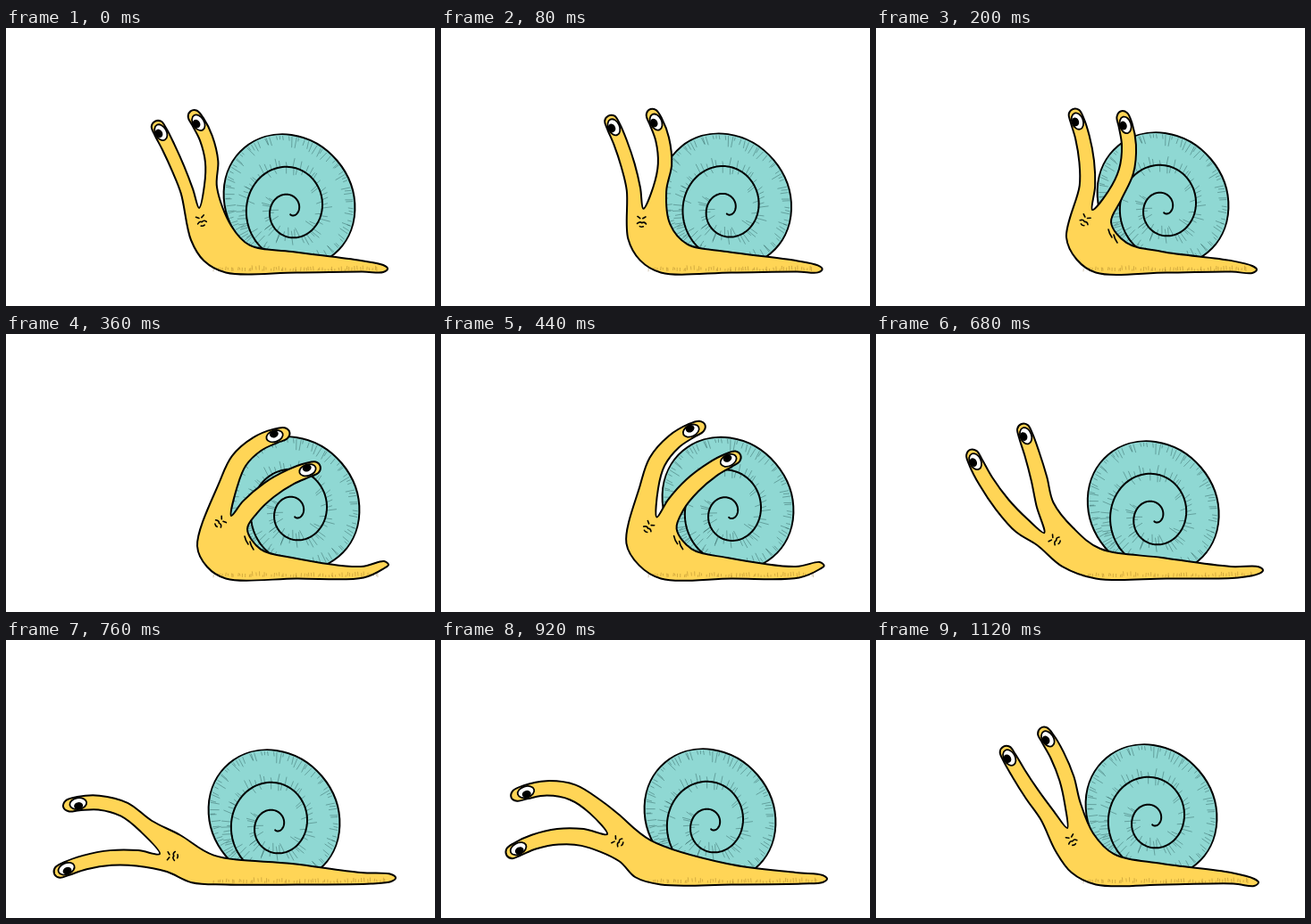
An HTML page with a canvas that plays this animation: 480 by 312 pixels, repeating every 1200 ms.

```html
<!DOCTYPE html>
<html lang="en">
<head>
<meta charset="utf-8">
<title>Snail</title>
<style>
  html, body { margin: 0; width: 100%; height: 100%; overflow: hidden; background: #fff; }
  canvas { display: block; width: 480px; height: 312px; }
</style>
</head>
<body>
<canvas id="stage" width="480" height="312"></canvas>
<script>
const ctx = document.getElementById('stage').getContext('2d');
const LOOP = 1200;
const STEPS = [0, 80, 160, 200, 280, 320, 360, 400, 480, 560, 640, 720, 760, 840, 920, 1040, 1120];
const YELLOW = '#ffd556', TEAL = '#8fd8d3', INK = '#000';
const RAD = Math.PI / 180, GROUND = 274.5;

// lean turns the head; stalks are two angles from upright, reach their length,
// bend how far they bow, girth half their width at the root.
const poses = [
  { time: 0, lean: -15, stalks: [-27, -5], reach: 109, bend: 3, girth: 7,
    fork: [216, 202], chest: [207, 238], nape: [252, 222], tail: [427, 270], shell: [317, 194] },
  { time: 200, lean: 30, stalks: [-11, 16], reach: 115, bend: 8, girth: 9,
    fork: [242, 204], chest: [213, 235], nape: [263, 218], tail: [426, 271], shell: [321, 192] },
  { time: 360, lean: 55, stalks: [35, 61], reach: 114, bend: -23, girth: 11,
    fork: [252, 204], chest: [214, 238], nape: [270, 219], tail: [428, 259], shell: [322, 190] },
  { time: 560, lean: -45, stalks: [-2, 23], reach: 128, bend: -22, girth: 11,
    fork: [199, 212], chest: [181, 222], nape: [238, 217], tail: [431, 264], shell: [317, 193] },
  { time: 760, lean: -85, stalks: [-101, -64], reach: 120, bend: 11, girth: 9,
    fork: [172, 240], chest: [180, 260], nape: [195, 219], tail: [436, 267], shell: [300, 198] },
  { time: 920, lean: -60, stalks: [-102, -69], reach: 115, bend: 13, girth: 10,
    fork: [186, 218], chest: [199, 248], nape: [198, 195], tail: [432, 268], shell: [301, 197] },
  { time: 1120, lean: -25, stalks: [-38, -15], reach: 116, bend: -3, girth: 9,
    fork: [214, 211], chest: [201, 237], nape: [243, 217], tail: [428, 272], shell: [308, 192] }
];

const mix = (a, b, u) => Array.isArray(a) ? a.map((v, i) => mix(v, b[i], u)) : a + (b - a) * u;
const add = (p, q) => [p[0] + q[0], p[1] + q[1]];

function turn([x, y], deg) {
  const c = Math.cos(deg * RAD), s = Math.sin(deg * RAD);
  return [x * c - y * s, x * s + y * c];
}

function random(seed) {
  return () => (seed = (seed * 16807) % 2147483647) / 2147483647;
}

function poseAt(t) {
  const i = poses.findLastIndex(p => p.time <= t);
  const a = poses[i], b = poses[(i + 1) % poses.length];
  const u = (t - a.time) / ((b.time || LOOP) - a.time);
  return Object.fromEntries(Object.keys(a).map(key => [key, mix(a[key], b[key], u)]));
}

// Centripetal closed spline through the points.
function spline(pts) {
  const path = new Path2D(), n = pts.length;
  const gap = (p, q) => Math.sqrt(Math.hypot(p[0] - q[0], p[1] - q[1])) || 0.001;
  const handle = (prev, p, next) => {
    const d = gap(prev, p), e = gap(p, next);
    return p.map((v, k) =>
      (d * d * next[k] - e * e * prev[k] + (2 * d * d + 3 * d * e + e * e) * v) / (3 * d * (d + e)));
  };
  path.moveTo(...pts[0]);
  for (let i = 0; i < n; i++) {
    const [p0, p1, p2, p3] = [n - 1, 0, 1, 2].map(k => pts[(i + k) % n]);
    path.bezierCurveTo(...handle(p0, p1, p2), ...handle(p3, p2, p1), ...p2);
  }
  path.closePath();
  return path;
}

function ellipse(x, y, rx, ry, deg = 0) {
  const path = new Path2D();
  path.ellipse(x, y, rx, ry, deg * RAD, 0, 2 * Math.PI);
  return path;
}

function stroke(path, width, color = INK) {
  ctx.lineWidth = width;
  ctx.strokeStyle = color;
  ctx.stroke(path);
}

function fill(path, color) {
  ctx.fillStyle = color;
  ctx.fill(path);
}

// Shell, drawn around its own centre.
const RIM = { long: 78, short: 70, deg: 50 };
const rimPoint = a => turn([RIM.long * Math.cos(a), RIM.short * Math.sin(a)], RIM.deg);
const rim = ellipse(0, 0, RIM.long, RIM.short, RIM.deg);

function coilPoint(s) {
  const a = (120 + 690 * s) * RAD, r = 3 + 55 * (1 - s);
  return [1 + 0.92 * r * Math.cos(a), 12 - 5 * (1 - s) + r * Math.sin(a)];
}

function makeCoil() {
  const path = new Path2D();
  for (let s = 0; s <= 1; s += 0.005) path.lineTo(...coilPoint(s));
  return path;
}

function makeHatch() {
  const path = new Path2D(), rnd = random(4711);
  const line = ([x, y], angle, len) => {
    path.moveTo(x, y);
    path.lineTo(x + Math.cos(angle) * len, y + Math.sin(angle) * len);
  };
  for (let i = 0; i < 95; i++) {
    const [x, y] = rimPoint((i + rnd()) / 95 * 2 * Math.PI);
    line([x * 0.97, y * 0.97], Math.atan2(-y, -x) + (rnd() - 0.5) * 0.25, 3 + rnd() * 9);
  }
  for (let i = 0; i < 90; i++) {
    const p = coilPoint(0.65 * Math.pow((i + rnd()) / 90, 1.2));
    const out = Math.atan2(p[1] - 12, p[0]) + (rnd() - 0.5) * 0.3;
    line(p, rnd() < 0.65 ? out : out + Math.PI, 4 + rnd() * 8);
  }
  return path;
}

const coil = makeCoil(), hatch = makeHatch();

function drawShell([x, y]) {
  ctx.save();
  ctx.translate(x, y);
  fill(rim, TEAL);
  stroke(hatch, 0.6, 'rgba(20,60,60,.6)');
  stroke(coil, 2);
  stroke(rim, 2);
  ctx.restore();
}

// A stalk is a bowed line from the head; side is -1 for left, 1 for right.
function makeStalk({ fork, lean, stalks, reach, bend, girth }, side) {
  const root = add(fork, turn([side * girth, 0], lean));
  const tip = add(fork, turn([0, -reach], stalks[side < 0 ? 0 : 1]));
  const dx = tip[0] - root[0], dy = tip[1] - root[1], len = Math.hypot(dx, dy);
  const bow = 2 * (side < 0 ? bend : bend + 12) / len;
  const knee = add(mix(root, tip, 0.5), [-dy * bow, dx * bow]);

  const at = u => mix(mix(root, knee, u), mix(knee, tip, u), u);
  const tilt = u => {
    const [ax, ay] = mix(root, knee, u), [bx, by] = mix(knee, tip, u);
    return Math.atan2(bx - ax, ay - by) / RAD;
  };
  const edge = (u, way) => {
    const cap = Math.sqrt(1 - Math.max(0, (u - 0.93) / 0.07) ** 2);
    return add(at(u), turn([way * mix(girth, 7.5, u) * cap, 0], tilt(u)));
  };
  const us = [0.2, 0.45, 0.7, 0.88, 0.97];
  const outline = [...us.map(u => edge(u, -1)), tip, ...us.map(u => edge(u, 1)).reverse()];
  const eyeAt = 1 - 14 / len;
  return { outline, eye: at(eyeAt), tilt: tilt(eyeAt) };
}

function bodyPath({ tail, chest, fork, nape }, [left, right]) {
  const belly = [246, GROUND], saddle = [320, 251];
  return spline([
    tail, add(tail, [-5, 4]), [tail[0] - 28, GROUND - 1], [325, GROUND], belly,
    add(mix(chest, belly, 0.5), [-5, 5]), chest,
    ...left.outline, fork, ...right.outline,
    nape, add(mix(nape, saddle, 0.3), [0, 13]), saddle, [397, 261], add(tail, [-5, -4])
  ]);
}

function drawTicks({ tail }) {
  const path = new Path2D(), rnd = random(99);
  for (let i = 0; i < 60; i++) {
    const x = mix(232, tail[0] - 10, (i + rnd()) / 60), y = 273 - rnd() * 2;
    path.moveTo(x, y);
    path.lineTo(x + rnd() - 0.5, y - 1.5 - rnd() * 3);
  }
  stroke(path, 0.6, 'rgba(110,75,10,.5)');
}

function drawCreases([x, y]) {
  const path = new Path2D();
  for (let i = 0; i < 2; i++) {
    path.moveTo(x - 3 + 6 * i, y + 8 + 6 * i);
    path.quadraticCurveTo(x - 2 + 6 * i, y + 13 + 6 * i, x + 1 + 6 * i, y + 17 + 6 * i);
  }
  stroke(path, 1.6);
}

function drawEye({ eye, tilt }) {
  ctx.save();
  ctx.translate(...eye);
  ctx.rotate(tilt * RAD);
  const white = ellipse(0, 0, 6.3, 9.5);
  fill(white, '#fff');
  ctx.save();
  ctx.clip(white);
  fill(ellipse(-2.5, 0, 4, 5), INK);
  ctx.restore();
  stroke(white, 1.8);
  ctx.restore();
}

const features = new Path2D('M-5-6l3 2M4-6l-3 2M-5 2q3-3 5-1q3-2 5 1M-2 5q2 1 4 0');

function drawFace({ fork, lean }) {
  ctx.save();
  ctx.translate(...fork);
  ctx.rotate(lean * RAD);
  ctx.translate(-1, 15);
  stroke(features, 1.6);
  ctx.restore();
}

function draw(t) {
  const pose = poseAt(t);
  const stalks = [-1, 1].map(side => makeStalk(pose, side));
  const body = bodyPath(pose, stalks);
  fill(new Path2D('M0 0H480V312H0z'), '#fff');
  drawShell(pose.shell);
  fill(body, YELLOW);
  drawTicks(pose);
  stroke(body, 2);
  if (pose.lean > 20) drawCreases(pose.nape);
  stalks.forEach(drawEye);
  drawFace(pose);
}

function tick() {
  const now = performance.now() % LOOP;
  draw(STEPS.findLast(s => s <= now));
  requestAnimationFrame(tick);
}

ctx.lineCap = ctx.lineJoin = 'round';
tick();
</script>
</body>
</html>
```
